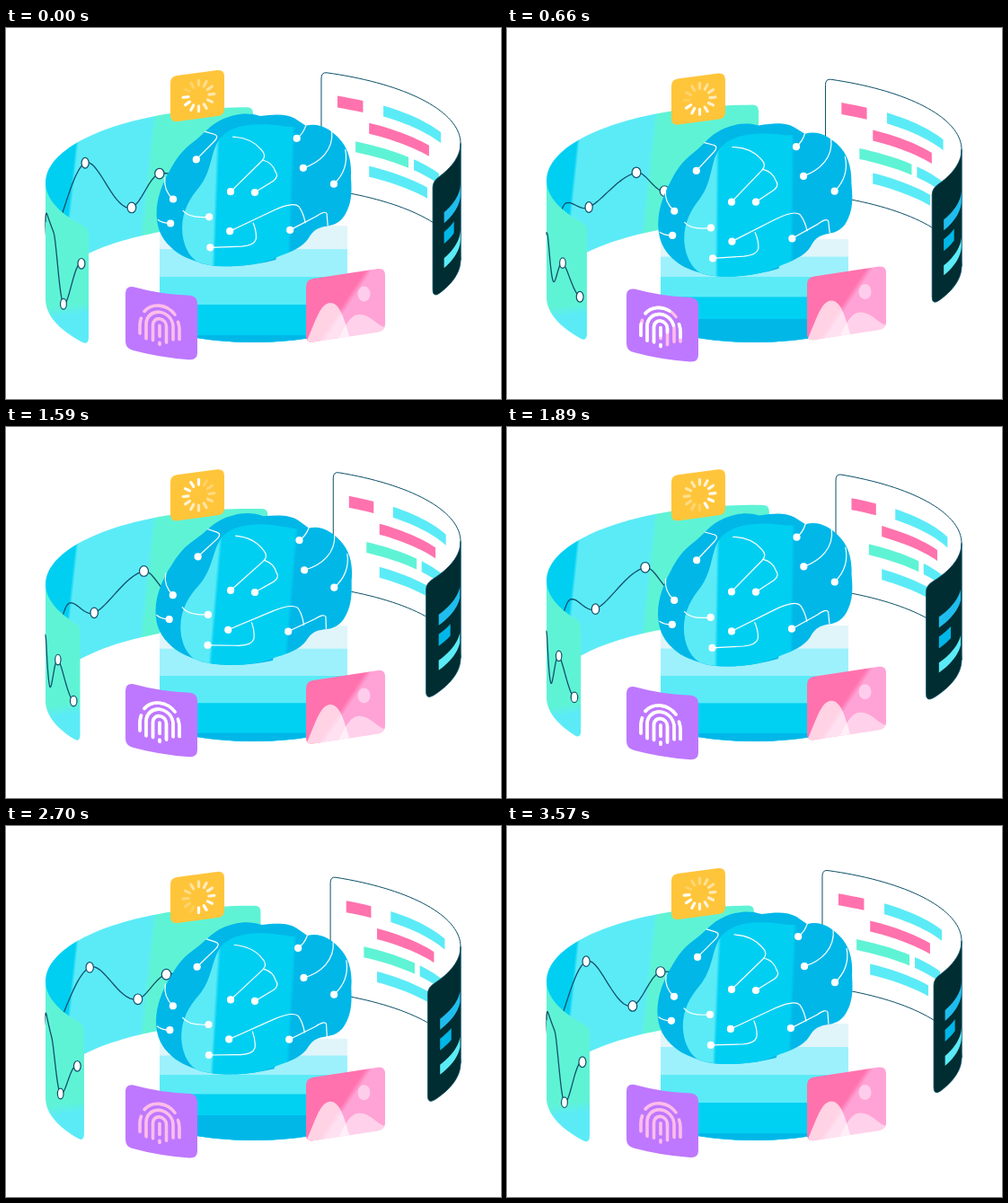
An HTML page for the animation above (3600 ms loop, 551 by 413 pixels).

```html
<!DOCTYPE html>
<html lang="en">
<head>
<meta charset="utf-8">
<title>Floating brain with data panels</title>
<style>
html, body { margin: 0; width: 100%; height: 100%; overflow: hidden; background: #fff; }
svg { display: block; width: 551px; height: 413px; }
.wire { fill: none; stroke: #fff; stroke-width: 1.2; stroke-linecap: round; stroke-linejoin: round; }
.graph { fill: none; stroke: #12506a; stroke-width: 1.3; }
.print { fill: none; stroke-width: 3.6; stroke-linecap: round; }
.dot { fill: #fff; stroke: #12506a; stroke-width: 1.2; }
</style>
</head>
<body>
<svg viewBox="0 0 551 413" xmlns="http://www.w3.org/2000/svg">
  <defs>
    <linearGradient id="innerFill" gradientUnits="userSpaceOnUse" x1="44" y1="172" x2="284" y2="198">
      <stop offset=".118" stop-color="#00cff2"/><stop offset=".132" stop-color="#5bebf7"/>
      <stop offset=".455" stop-color="#5bebf7"/><stop offset=".48" stop-color="#5ff3d5"/>
    </linearGradient>
    <linearGradient id="outerFill" gradientUnits="userSpaceOnUse" x1="62" y1="300" x2="66" y2="330">
      <stop offset=".3" stop-color="#5ff3d5"/><stop offset=".7" stop-color="#5bebf7"/>
    </linearGradient>
    <linearGradient id="lobeFill" gradientUnits="userSpaceOnUse" x1="195" y1="180" x2="385" y2="188">
      <stop offset=".195" stop-color="#5bebf7"/><stop offset=".215" stop-color="#00cff2"/>
      <stop offset=".635" stop-color="#00cff2"/><stop offset=".655" stop-color="#00b7e8"/>
    </linearGradient>
    <linearGradient id="photoFill" gradientUnits="userSpaceOnUse" x1="372" y1="292" x2="396" y2="308">
      <stop offset=".38" stop-color="#ff72ad"/><stop offset=".6" stop-color="#ffa3d6"/>
    </linearGradient>
    <clipPath id="drum"><path d="M171 200H380V325A104.5 25 0 0 1 171 325Z"/></clipPath>
    <clipPath id="photoClip"><path id="photoShape" d="M334 288Q334 280 342 279L414 268Q422 267 422 275V330Q422 337 414 338.500L342 349.500Q334 351 334 343Z"/></clipPath>
  </defs>

  <path id="innerL" fill="url(#innerFill)"/>
  <path id="graphBack" class="graph"/>
  <g id="dotsBack"></g>

  <path id="innerR" fill="#fff" stroke="#0b5068"/>
  <g id="bars"></g>
  <path id="outerR" fill="#002d31" stroke="#0b5068" stroke-width=".8"/>
  <g id="outerBars"></g>

  <g id="drumBands" clip-path="url(#drum)"></g>

  <path id="outerL" fill="url(#outerFill)"/>
  <path id="graphFront" class="graph"/>
  <g id="dotsFront"></g>

  <g id="brain">
    <path fill="#00b7e8" d="M167.500 208C167 190 174 172 183 157C190 144 197 135 208 127C222 117 226 108 242 101C254 96 268 93 283 98C299 96 312 95 322 101L334 109L300 258C270 266 232 268 213 260C202 256 194 253 187 247C175 237 168 226 167.500 208Z"/>
    <path fill="url(#lobeFill)" d="M196 226C195 205 204 190 215 177C228 161 228 142 235 128C242 114 258 109 274 107.500C292 106 305 109 316 110C322 110 328 110 334 109C349 105 361 113 370 122C382 134 385 150 384 166C385 181 385 193 379 205C374 216 366 220 356 221C344 223 341 227 336 235C330 244 316 250 304 254C289 261 270 265 250 265C236 265 223 264 213 260C203 254 197 241 196 226Z"/>
    <g id="wires"></g>
  </g>

  <g id="loader">
    <path fill="#ffc53a" d="M183 61Q183 54 190 53L235 47Q243 46 243 54V90Q243 97 236 98L191 104Q183 105 183 97Z"/>
    <g id="spokes" fill="none" stroke="#fff" stroke-width="3.2" stroke-linecap="round"></g>
  </g>

  <g id="touch">
    <path fill="#be78ff" d="M133 295Q133 286 142 287.500Q173 296 205 297Q213 298 213 306V361Q213 369 204 368.500Q170 366 141 358Q133 356 133 348Z"/>
    <g id="prints" transform="translate(171 328.500) skewY(6)"></g>
  </g>

  <g id="photo">
    <use href="#photoShape" fill="url(#photoFill)"/>
    <g clip-path="url(#photoClip)">
      <ellipse cx="398.500" cy="296" rx="7" ry="8.500" fill="#ffcdec"/>
      <path fill="#fff" fill-opacity=".68" d="M332 354C342 336 348 306 361 306C374 306 378 332 385 352Z"/>
      <path fill="#fff" fill-opacity=".5" d="M368 352C376 332 384 318 394 319C406 319 413 332 424 334V356Z"/>
    </g>
  </g>
</svg>
<script>
const $ = id => document.getElementById(id);
const LOOP = 3600, H = 130, RAD = Math.PI / 180;

function add(parent, tag, attrs) {
  const el = document.createElementNS('http://www.w3.org/2000/svg', tag);
  for (const k in attrs) el.setAttribute(k, attrs[k]);
  $(parent).appendChild(el);
  return el;
}
const set = (id, k, v) => $(id).setAttribute(k, v);
const f = n => n.toFixed(2);
const str = p => p.map(f).join(' ');
const part = (t, a, b) => Math.min(1, Math.max(0, (t - a) / (b - a)));
const smooth = (t, a, b) => {
  const p = part(t, a, b);
  return p * p * (3 - 2 * p);
};
const sine = (t, a, b) => (1 - Math.cos(Math.PI * part(t, a, b))) / 2;

// Point on a cylinder wall: side is -1 (left) or 1 (right), a in degrees, v down the wall
const wall = (side, cy, a, v) =>
  [275 + side * 231 * Math.cos(a * RAD), cy - 84 * Math.sin(a * RAD) + v];

function arc(side, cy, a0, a1, v) {
  const n = Math.max(4, Math.ceil(Math.abs(a1 - a0) / 2)), out = [];
  for (let i = 0; i <= n; i++) out.push(str(wall(side, cy, a0 + (a1 - a0) * i / n, v)));
  return out.join('L');
}
const strip = (side, cy, a0, a1, v, h) =>
  `M${arc(side, cy, a0, a1, v)}L${arc(side, cy, a1, a0, v + h)}Z`;

// Wall from the outermost line to a free end with rounded corners
function panel(side, cy, end, round) {
  const near = end - Math.sign(end) * round, top = wall(side, cy, end, 0), low = wall(side, cy, end, H);
  return `M${arc(side, cy, 0, near, 0)}Q${str(top)} ${f(top[0])} ${f(top[1] + 7)}` +
    `V${f(low[1] - 9)}Q${str(low)} ${str(wall(side, cy, near, H))}L${arc(side, cy, near, 0, H)}Z`;
}

// Graph knots: angle, first value, second value, has a dot
const knots = [
  [-34.2, 43, 88, 1], [-24, 101, 55.5, 1], [-16, 32, 97, 0], [-7, 25, 55, 0], [14, 98, 85, 0],
  [23, 68, 60, 0], [36, 27.5, 86, 1], [54.2, 96, 57, 1], [63.2, 65, 90, 1], [76, 78, 50, 0]
];
const level = (k, m) => k[1] + (k[2] - k[1]) * m;

// Smooth curve through the knots that never overshoots them
function curve(m) {
  const v = knots.map(k => level(k, m)), last = v.length - 1;
  const step = i => knots[i + 1][0] - knots[i][0];
  const rise = i => (v[i + 1] - v[i]) / step(i);
  const slope = v.map((_, i) => {
    if (i === 0 || i === last) return 0;
    const p = rise(i - 1), q = rise(i);
    return p * q > 0 ? 2 * p * q / (p + q) : 0;
  });
  return a => {
    let i = 0;
    while (i < last - 1 && a > knots[i + 1][0]) i++;
    const w = step(i), p = (a - knots[i][0]) / w, e = p * p * (3 - 2 * p), q = 1 - p;
    return v[i] * (1 - e) + v[i + 1] * e + w * p * q * (slope[i] * q - slope[i + 1] * p);
  };
}
function graph(cy, turn, value, from, to) {
  const out = [];
  for (let i = 0; i <= 70; i++) {
    const a = from + (to - from) * i / 70;
    out.push(str(wall(-1, cy, a + turn, value(a))));
  }
  return 'M' + out.join('L');
}
const dots = knots.filter(k => k[3]).map(k =>
  ({ k, el: add(k[0] < 0 ? 'dotsFront' : 'dotsBack', 'ellipse', { class: 'dot' }) }));

// Text bars: angles, top, height, colour
const PINK = '#ff72ad', SKY = '#5bebf7', MINT = '#5ff3d5';
const bars = [
  ['bars', 66, 58, 24, 13, PINK], ['bars', 51.1, 25.2, 23.5, 12, SKY],
  ['bars', 56, 32, 47, 12, PINK], ['bars', 60.4, 41.5, 71, 12, MINT],
  ['bars', 39.2, 26.4, 71, 12, SKY], ['bars', 56, 32.9, 95, 12, SKY],
  ['outerBars', -23, -1, 44, 12, '#1fbdee'], ['outerBars', -23, -14.5, 66, 13, '#00b7e8'],
  ['outerBars', -23, -1, 95, 11, SKY]
].map(([g, a0, a1, v, h, fill]) => ({ a0, a1, v, h, el: add(g, 'path', { fill }) }));

const bands = ['#e0f5fa', '#9df1fc', '#5bebf7', '#00d0f2', '#00b7e8'].map(fill =>
  add('drumBands', 'rect', { x: 170, width: 212, height: 200, fill }));

[
  'M212 146L232 126Q238 120 232 118L222 115', 'M324 123Q331 118 334 109',
  'M331 156C350 150 365 136 363 115', 'M365 174Q382 158 378 136',
  'M186 190Q175 180 177 166', 'M183 217Q174 217 169 213',
  'M250 182L285 148Q291 142 284 135Q273 122 253 121', 'M277 183L298 170Q304 165 300 160Q297 150 286 147',
  'M226 210Q204 212 197 203', 'M227 244L262 243Q276 242 278 235Q279 227 275 217',
  'M249 226L298 203Q320 193 326 199Q331 206 333 217', 'M316 225L345 210Q355 203 357 207L358 220'
].forEach(d => add('wires', 'path', { class: 'wire', d }));
[[324, 123], [212, 146], [331, 156], [365, 174], [186, 190], [183, 217], [250, 182], [277, 183],
 [226, 210], [227, 244], [249, 226], [316, 225]
].forEach(([cx, cy]) => add('wires', 'circle', { cx, cy, r: 4.1, fill: '#fff' }));

const spokes = Array.from({ length: 12 }, (_, i) => {
  const s = Math.sin(i * 30 * RAD), c = -Math.cos(i * 30 * RAD);
  const at = r => str([214.5 + s * r, 75.3 + c * r - s * r * 0.11]);
  return add('spokes', 'path', { d: `M${at(11.5)}L${at(17.3)}` });
});

const ridges = [
  'M-17 -12A22 22 0 0 1 17 -12', 'M-22 13V4Q-22 0 -20.500 -4', 'M20.500 -4Q22 0 22 4V15',
  'M-15 18V2A15 15 0 0 1 15 2V16', 'M-7.500 19V2A7.500 7.500 0 0 1 7.500 2V20', 'M0 2V14', 'M0 21V23'
];
ridges.forEach(d => add('prints', 'path', { class: 'print', stroke: '#ffbde9', d }));
const lit = ridges.map(d => add('prints', 'path', { class: 'print', stroke: '#fff', pathLength: 100, d }));

function draw(t) {
  const wave = (peak, period = 1800) => Math.cos(2 * Math.PI * (t - peak) / period);
  const turnL = 2.1 * (1 - wave(0, LOOP));
  const turnR = 4.1 * (sine(t, 0, 2100) - sine(t, 2100, LOOP));
  const bob = 6 * (1 - wave(-50));
  const tilt = 0.4 - 3.8 * wave(400);
  const liftL = 0.4 + 4.1 * wave(1330), liftR = 1.3 + 4 * wave(690);
  const cyL = 172 + liftL, cyR = 130 + liftR;
  const m = smooth(t, 0, 810) - smooth(t, 2077, 2907), value = curve(m);

  set('innerL', 'd', panel(-1, cyL, 90 + turnL, 1.6));
  set('outerL', 'd', panel(-1, cyL, -37.6 + turnL, 3));
  set('innerR', 'd', panel(1, cyR, 70.8 - turnR, 1.6));
  set('outerR', 'd', panel(1, cyR, -30 - turnR, 4));
  for (const b of bars) b.el.setAttribute('d', strip(1, cyR, b.a0 - turnR, b.a1 - turnR, b.v, b.h));

  set('graphBack', 'd', graph(cyL, turnL, value, -turnL, 76));
  set('graphFront', 'd', graph(cyL, turnL, value, -34.2, -turnL));
  for (const { k, el } of dots) {
    const a = k[0] + turnL, [x, y] = wall(-1, cyL, a, level(k, m));
    el.setAttribute('cx', f(x));
    el.setAttribute('cy', f(y));
    el.setAttribute('rx', f(2 + 3.5 * Math.abs(Math.sin(a * RAD))));
    el.setAttribute('ry', 5.8);
  }

  const h = 31 - 0.8 * bob;
  [220 + 1.4 * bob, 277 - h, 277, 277 + h, 277 + 2.1 * h].forEach((y, i) => bands[i].setAttribute('y', f(y)));
  set('brain', 'transform', `translate(0 ${f(bob)}) rotate(${f(tilt)} 275 183)`);

  set('loader', 'transform', `translate(0 ${f(bob / 3)})`);
  set('touch', 'transform', `translate(0 ${f(0.8 + 3 * wave(460))})`);
  set('photo', 'transform', `translate(0 ${f(liftL)})`);

  const head = 295 + t / 2;
  spokes.forEach((s, i) => {
    const lag = (((head - i * 30) % 360) + 360) % 360;
    s.setAttribute('opacity', f(Math.min(1, 1.15 - lag / 360)));
  });

  const on = 100 * smooth(t, 250, 850), off = 100 * smooth(t, 1900, 2500);
  for (const p of lit) {
    p.setAttribute('stroke-dasharray', `0 ${f(off)} ${f(on - off)} 200`);
    p.setAttribute('visibility', on - off > 0.5 ? 'visible' : 'hidden');
  }
}

function tick(now) {
  draw(now % LOOP);
  requestAnimationFrame(tick);
}
draw(0);
requestAnimationFrame(tick);
</script>
</body>
</html>
```
